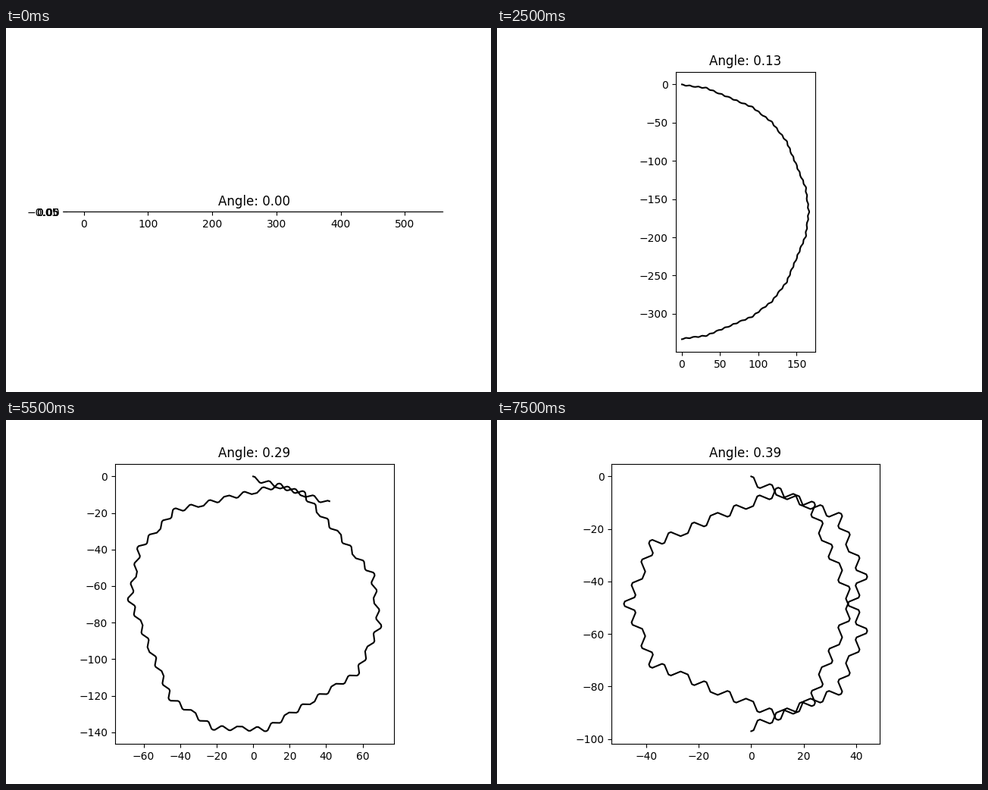
A matplotlib script that plays this animation: 640 by 480 pixels, repeating every 8 s.

```python
import numpy as np
import matplotlib.pyplot as plt
from matplotlib.animation import FuncAnimation

AXIOM = "-D--D"
RULES = {
    "A": "F++FFFF--F--FFFF++F++FFFF--F",
    "B": "F--FFFF++F++FFFF--F--FFFF++F",
    "C": "BFA--BFA",
    "D": "CFC--CFC",
}
DEPTH = 3
STEP_ANGLE = np.pi / 120
FRAMES = 16
INTERVAL = 500


def expand(text, depth):
    for _ in range(depth):
        text = "".join(RULES.get(c, c) for c in text)
    return text


def headings(path):
    """Heading of every forward step, counted in unit turns."""
    turn, steps = 0, []
    for c in path:
        if c == "F":
            steps.append(turn)
        else:
            turn += {"+": 1, "-": -1}.get(c, 0)
    return np.array(steps)


TURNS = headings(expand(AXIOM, DEPTH))


def trace(angle):
    x = np.cumsum(np.cos(TURNS * angle))
    y = np.cumsum(np.sin(TURNS * angle))
    return np.append(0, x), np.append(0, y)


fig, ax = plt.subplots(figsize=(6.4, 4.8), dpi=100)


def update(i):
    angle = i * STEP_ANGLE
    ax.clear()
    ax.set_aspect("equal")
    ax.plot(*trace(angle), color="black")
    ax.set_title(f"Angle: {angle:.2f}")


anim = FuncAnimation(fig, update, frames=FRAMES, interval=INTERVAL,
                     repeat=True, repeat_delay=0)
plt.show()
```
